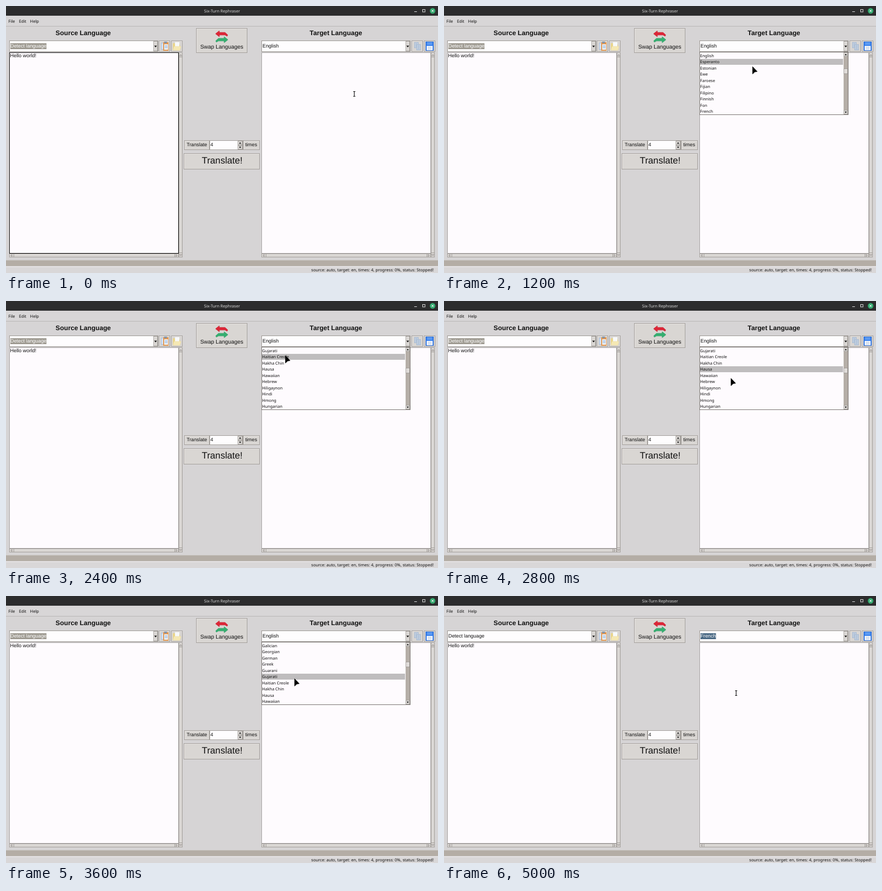
Recreate the animation shown at these times as an HTML page with a canvas. Size 800x495 px, loop 5.1 s.

```html
<!DOCTYPE html>
<html lang="en">
<head>
<meta charset="utf-8">
<title>Translator window</title>
<style>
html, body { margin: 0; width: 100%; height: 100%; overflow: hidden; background: #d6d4d5; }
canvas { display: block; width: 800px; height: 495px; }
</style>
</head>
<body>
<canvas id="stage" width="800" height="495"></canvas>
<script>
const ctx = document.getElementById('stage').getContext('2d');
const LOOP = 5100, STEP = 100;
const SANS = '"Liberation Sans", Arial, sans-serif';
const UI = '"Noto Sans", sans-serif';
const FACE = '#d9d6d3', FIELD = '#fefbfe', EDGE = '#a39f9b', INK = '#111';
const LANGUAGES = ('English,Esperanto,Estonian,Ewe,Faroese,Fijian,Filipino,Finnish,Fon,French,' +
  'French (Canada),Frisian,Friulian,Fulani,Ga,Galician,Georgian,German,Greek,Guarani,Gujarati,' +
  'Haitian Creole,Hakha Chin,Hausa,Hawaiian,Hebrew,Hiligaynon,Hindi,Hmong,Hungarian').split(',');
const ROW = 11.5, LIST_Y = 86.3;

// Pointer path: time, x, y
const PATH = [
  [0, 645, 163], [300, 647, 160], [600, 671, 79], [800, 741, 73], [900, 741, 73],
  [1100, 610, 104], [1200, 571, 112], [1500, 540, 158], [1800, 540, 158],
  [2200, 517, 101], [2400, 517, 101], [2900, 534, 153], [3600, 534, 153],
  [4100, 516, 159], [4200, 514, 153], [4300, 514, 166], [4600, 512, 138], [4700, 512, 138],
  [5000, 541, 180]
];
// List scroll: time, first visible row
const SCROLL = [[0, 0], [1900, 5], [2000, 10], [2100, 15], [2200, 20], [3100, 15], [3700, 10], [3900, 5]];
const FOCUS_TARGET = 300, OPEN = 900, CLOSE = 4800;

function pointerAt(t) {
  const next = PATH.findIndex(p => p[0] > t);
  if (next < 0) return PATH.at(-1).slice(1);
  if (next === 0) return PATH[0].slice(1);
  const a = PATH[next - 1], b = PATH[next], k = (t - a[0]) / (b[0] - a[0]);
  return [a[1] + (b[1] - a[1]) * k, a[2] + (b[2] - a[2]) * k];
}

function rect(x, y, w, h, fill) {
  ctx.fillStyle = fill;
  ctx.fillRect(x, y, w, h);
}

function box(x, y, w, h, fill, edge = EDGE) {
  rect(x, y, w, h, edge);
  rect(x + 1, y + 1, w - 2, h - 2, fill);
}

function raised(x, y, w, h, fill = FACE) {
  box(x, y, w, h, fill);
  rect(x + 1, y + 1, w - 2, 1, '#e6e3e1');
  rect(x + 1, y + 1, 1, h - 2, '#e6e3e1');
}

function poly(points, fill, stroke, width = 1) {
  ctx.beginPath();
  points.forEach(([x, y]) => ctx.lineTo(x, y));
  ctx.closePath();
  if (stroke) {
    ctx.strokeStyle = stroke;
    ctx.lineWidth = width;
    ctx.stroke();
  }
  if (fill) {
    ctx.fillStyle = fill;
    ctx.fill();
  }
}

function line(points, color, width = 1) {
  ctx.beginPath();
  points.forEach(([x, y], i) => i ? ctx.lineTo(x, y) : ctx.moveTo(x, y));
  ctx.strokeStyle = color;
  ctx.lineWidth = width;
  ctx.stroke();
}

function text(str, x, y, size, { font = SANS, color = INK, align = 'left', weight = 'normal' } = {}) {
  ctx.font = `${weight} ${size}px ${font}`;
  ctx.textAlign = align;
  ctx.fillStyle = color;
  ctx.fillText(str, x, y);
}

function triangle(x, y, size, angle, fill, stroke) {
  ctx.save();
  ctx.translate(x, y);
  ctx.rotate(angle);
  poly([[-size, size * 0.6], [size, size * 0.6], [0, -size * 0.7]], fill, stroke, 0.8);
  ctx.restore();
}

function titleBar() {
  rect(0, 0, 800, 18, '#2c2c2d');
  text('Six-Turn Rephraser', 400, 12, 7.5, { font: UI, color: '#dadada', align: 'center' });
  rect(756, 10, 5, 1, '#e0e0e0');
  ctx.strokeStyle = '#e0e0e0';
  ctx.lineWidth = 1;
  ctx.strokeRect(771.5, 6.5, 4.5, 4.5);
  ctx.beginPath();
  ctx.arc(790, 9, 5.2, 0, Math.PI * 2);
  ctx.fillStyle = '#35a970';
  ctx.fill();
  line([[788, 7], [792, 11]], '#fff');
  line([[792, 7], [788, 11]], '#fff');
}

function menuBar() {
  rect(0, 18, 800, 20, '#d8d6d7');
  rect(0, 37, 800, 1, '#b9b6b6');
  [['File', 4.5], ['Edit', 24], ['Help', 44.5]].forEach(([s, x]) => text(s, x, 31, 7.6, { font: UI }));
}

function combo(x, value, selection) {
  box(x, 64, 276, 21, '#fefdfe', '#9b9792');
  if (selection) {
    ctx.font = `9.2px ${SANS}`;
    rect(x + 2, 69, ctx.measureText(value).width, 11, selection);
  }
  text(value, x + 2, 77, 9.2, { color: selection ? '#fff' : INK });
  raised(x + 267, 65, 8, 19);
  triangle(x + 271, 75, 2.5, Math.PI, INK);
}

function textArea(x, focused) {
  const right = x + 314, bottom = 459, faint = '#8e8a88';
  box(x, 86, 314, 373, FIELD, focused ? '#080808' : '#a7a3a3');
  raised(right, 86, 7, 380);
  rect(right, 94, 7, 1, EDGE);
  rect(right, 457, 7, 1, EDGE);
  triangle(right + 3.5, 91, 2, 0, null, faint);
  triangle(right + 3.5, 462, 2, Math.PI, null, faint);
  raised(x, bottom, 314, 7);
  rect(x + 8, bottom, 1, 7, EDGE);
  rect(x + 306, bottom, 1, 7, EDGE);
  triangle(x + 4, 462.5, 2, -Math.PI / 2, null, faint);
  triangle(x + 310, 462.5, 2, Math.PI / 2, null, faint);
}

function clipboardIcon(x) {
  box(x, 68, 6, 13, '#d5e2f3', '#a5bddd');
  rect(x + 4, 67, 10, 16, '#e39a55');
  rect(x + 6, 66, 5, 3, '#8193aa');
  rect(x + 6, 71, 7, 10, '#eef3fb');
  for (let i = 0; i < 3; i++) rect(x + 7, 73 + i * 2, 5, 1, '#92b5e2');
}

function folderIcon(x) {
  poly([[x, 69], [x + 5, 69], [x + 7, 71], [x + 13, 71], [x + 13, 82], [x, 82]], '#ead58c');
  rect(x + 4, 67, 8, 9, '#f7f9fb');
  poly([[x + 2, 75], [x + 15, 75], [x + 13, 82], [x, 82]], '#f5e8b4', '#e2cd84', 0.6);
}

function copyIcon(x) {
  [[0, 67], [4, 71]].forEach(([dx, y]) => {
    box(x + dx, y, 8, 11, '#c9d5e4', '#a3b7d0');
    for (let i = 0; i < 4; i++) rect(x + dx + 2, y + 2 + i * 2, 4, 1, '#a3b7d0');
  });
}

function floppyIcon(x) {
  box(x, 66, 15, 17, '#3b82ed', '#2a69cf');
  rect(x + 3, 67, 9, 5, '#5b9af2');
  rect(x + 2, 74, 11, 8, '#f6f9ff');
  rect(x + 4, 76, 7, 1, '#a7bdd8');
  rect(x + 4, 79, 7, 1, '#a7bdd8');
}

function swapArrow(y, dir, fill, edge) {
  ctx.save();
  ctx.translate(399.5, y);
  ctx.scale(dir, 1);
  poly([[-11.5, 0], [-4.5, -5.5], [-4.5, -2.5], [6, -2.5], [11, 2], [10, 4.5], [6, 2.3], [-4.5, 2.3], [-4.5, 5.5]], fill, edge, 0.8);
  ctx.restore();
}

function middleColumn() {
  const centered = { align: 'center' };
  raised(352, 41, 95, 46);
  swapArrow(51.5, 1, '#dc2637', '#b81d2c');
  swapArrow(62.5, -1, '#35ae70', '#25935a');
  text('Swap Languages', 399.5, 78.5, 10.3, centered);
  raised(330, 249, 47, 18);
  text('Translate', 353.5, 260.3, 9.2, centered);
  box(377, 249, 62, 18, '#fefdfe');
  text('4', 378.5, 260.3, 9.2);
  raised(429, 250, 9, 8);
  raised(429, 258, 9, 8);
  triangle(433.5, 254, 2.2, 0, INK);
  triangle(433.5, 262, 2.2, Math.PI, INK);
  raised(439, 249, 31, 18);
  text('times', 454, 260.3, 9.2, centered);
  raised(329, 273, 141, 30);
  text('Translate!', 400.3, 292, 17.1, centered);
}

function dropdown(t) {
  const top = SCROLL.filter(s => s[0] <= t).at(-1)[1];
  const hoverY = pointerAt(t - STEP)[1];
  const row = Math.max(0, Math.min(9, Math.floor((hoverY - LIST_Y) / ROW)));
  box(473, 85, 276, 117, FIELD, '#77736f');
  rect(474, Math.round(LIST_Y + row * ROW), 265, 11, '#bfbdbe');
  LANGUAGES.slice(top, top + 10).forEach((name, i) =>
    text(name, 474.3, 94.8 + i * ROW, 7.5, { font: UI }));
  rect(740, 86, 8, 115, '#b5aea7');
  raised(740, 86, 8, 8);
  raised(740, 193, 8, 8);
  triangle(744, 90, 2, 0, INK);
  triangle(744, 197, 2, Math.PI, INK);
  raised(740, Math.round(115.5 + top * 0.4), 8, 10, '#dedad7');
}

function pointer(t, open) {
  const [x, y] = pointerAt(t).map(Math.round);
  if (!open && y > 86) {
    line([[x - 2, y - 4.5], [x + 2, y - 4.5]], INK);
    line([[x, y - 4.5], [x, y + 4.5]], INK, 1.2);
    line([[x - 2, y + 4.5], [x + 2, y + 4.5]], INK);
    return;
  }
  ctx.lineJoin = 'round';
  poly([[0.5, 0.5], [9, 9.5], [4.5, 10.2], [0.5, 14]].map(([a, b]) => [x + a, y + b]), '#000', '#000', 0.8);
  ctx.lineJoin = 'miter';
}

function draw(t) {
  const open = t >= OPEN && t < CLOSE, chosen = t >= CLOSE;
  const targetFocus = t >= FOCUS_TARGET && t < OPEN;
  rect(0, 0, 800, 495, '#d6d4d5');
  titleBar();
  menuBar();
  const heading = { weight: 'bold', align: 'center' };
  text('Source Language', 143, 53.5, 12.2, heading);
  text('Target Language', 611, 53.5, 12.2, heading);

  textArea(6, t < FOCUS_TARGET);
  textArea(473, targetFocus);
  text('Hello world!', 7.5, 95, 9.3);
  if (targetFocus) rect(475, 88, 1, 10, INK);
  combo(6, 'Detect language', chosen ? null : '#9e9a91');
  combo(473, chosen ? 'French' : 'English', chosen ? '#4a6984' : null);

  [283, 306, 751, 774].forEach(x => raised(x, 64, 21, 21));
  clipboardIcon(287);
  folderIcon(309);
  copyIcon(756);
  floppyIcon(777);
  middleColumn();

  rect(0, 471, 800, 11, '#b4ada5');
  rect(0, 471, 800, 1, '#c4bfba');
  rect(0, 483, 800, 12, '#d9d7d8');
  rect(0, 483, 800, 1, '#eceaea');
  text('source: auto, target: en, times: 4, progress: 0%, status: Stopped!', 792, 491.7, 7.6, { font: UI, align: 'right' });

  if (open) dropdown(t);
  pointer(t, open);
}

ctx.textRendering = 'geometricPrecision';
const start = performance.now();
function tick() {
  const t = (performance.now() - start) % LOOP;
  draw(Math.floor(t / STEP) * STEP);
  requestAnimationFrame(tick);
}
tick();
</script>
</body>
</html>
```
